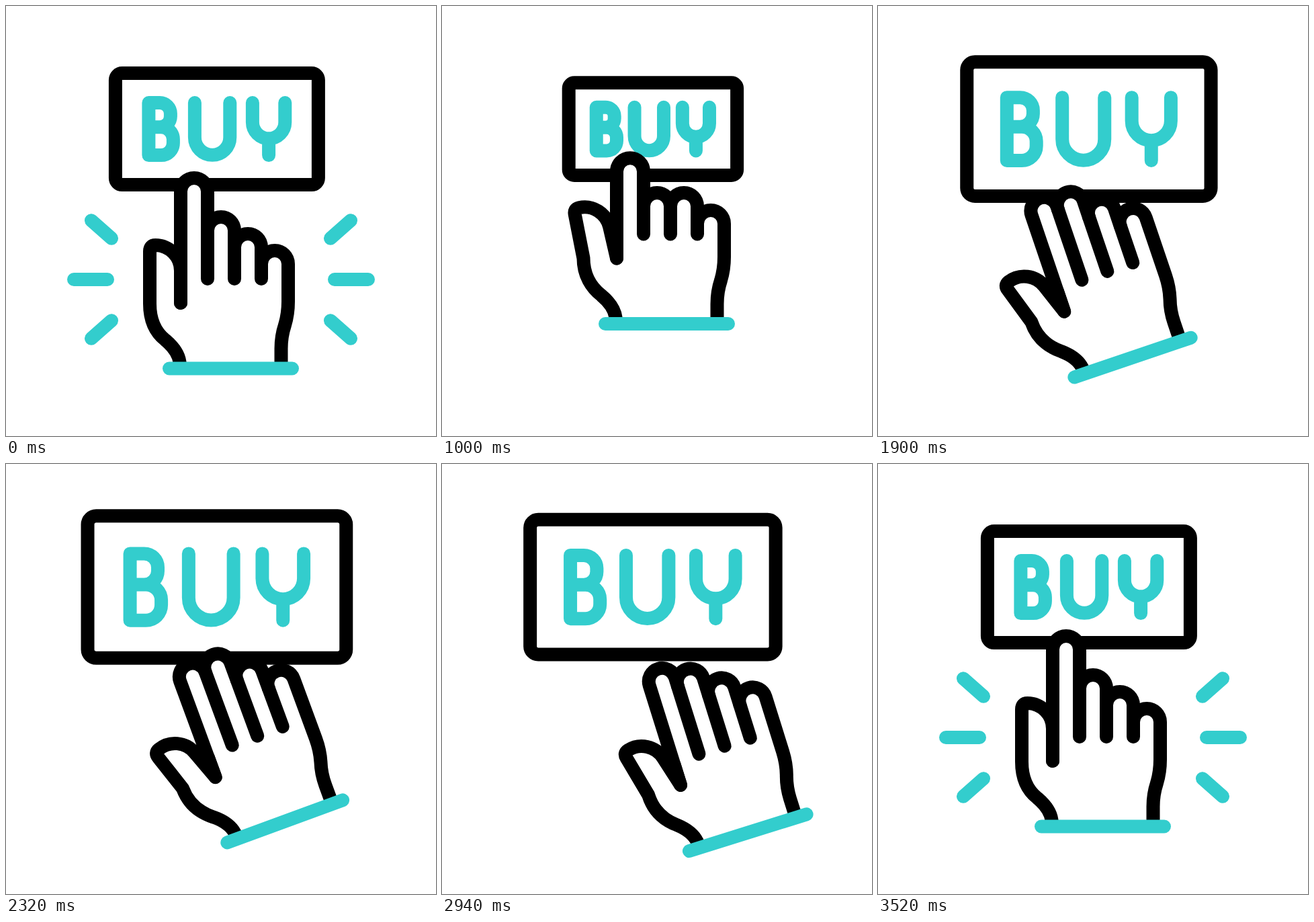
Write an HTML page that moves like this. It is 640 px wide and 640 px high and loops after 3600 ms.

```html
<!DOCTYPE html>
<html lang="en">
<head>
<meta charset="utf-8">
<title>Buy button</title>
<style>
  html, body { margin: 0; width: 100%; height: 100%; overflow: hidden; background: #fff; }
  svg { display: block; width: 100%; height: 100%; }
  path { fill: none; stroke-width: 20; stroke-linejoin: round; }
  .round { stroke-linecap: round; }
  .ink { stroke: #000; }
  .teal { stroke: #33cdcd; }
  .paper { fill: #fff; }
</style>
</head>
<body>
<svg viewBox="0 0 640 640">
  <path id="rays" class="teal round"/>
  <g id="button">
    <path class="ink paper" d="M-141 -83H141a10 10 0 0 1 10 10V73a10 10 0 0 1 -10 10H-141a10 10 0 0 1 -10 -10V-73a10 10 0 0 1 10 -10z"/>
    <path class="teal round" d="M-101.500 -39H-85a16 16 0 0 1 16 16V-18.800a16 16 0 0 1 -16 16H-101.500
      H-83a18 18 0 0 1 18 18V21a18 18 0 0 1 -18 18H-101.500z
      M-33 -39V12.500a26.200 26.200 0 0 0 52.400 0V-39
      M53 -39V-10a24.200 24.200 0 0 0 48.400 0V-39M77.200 14.500V39"/>
  </g>
  <g id="hand">
    <path id="outline" class="ink paper"/>
    <path id="gaps" class="ink round"/>
    <path class="teal round" d="M243 539.500H426"/>
  </g>
</svg>
<script>
const LOOP = 3600;
const el = id => document.getElementById(id);
const [rays, button, hand, outline, gaps] =
  ['rays', 'button', 'hand', 'outline', 'gaps'].map(el);

const mix = (a, b, p) => a + (b - a) * p;
// Eased progress from time a to time b.
function part(t, a, b) {
  const p = Math.min(1, Math.max(0, (t - a) / (b - a)));
  return p * p * (3 - 2 * p);
}

// Progress of every phase of the loop.
const phases = t => ({
  press: part(t, 200, 500),
  lift: part(t, 200, 800),
  bend: part(t, 500, 800),
  tap: t > 500 && t < 1100 ? Math.sin(Math.PI * (t - 500) / 600) ** 2 : 0,
  swing: part(t, 1400, 2000),
  grow: part(t, 1510, 2030),
  drift: part(t, 2000, 2800),
  close: part(t, 2800, 3250),
  home: part(t, 2800, 3400)
});

function drawButton(f) {
  const pressed = mix(1, .813, f.press) + .066 * f.tap;
  const s = mix(mix(pressed, 1.274, f.grow), 1, f.close);
  button.setAttribute('transform', `translate(313.900 183.100) scale(${s})`);
  for (const p of button.children) p.style.strokeWidth = 20 / s;
}

// Height of a fingertip, index finger first.
function fingertip(i, f) {
  const rest = i ? 289 + 25 * i : 256;
  const folded = i ? (i < 3 ? 344.5 : 370.5) : 278;
  const open = i ? 242 + 27.7 * i : 270;
  const lifted = mix(rest, folded, i ? f.lift : f.bend) + (i ? 0 : 60 * f.tap);
  return mix(mix(lifted, open, f.swing), rest, f.close);
}

function drawHand(f) {
  const spread = (13 * f.lift + 7 * f.swing) * (1 - f.close);
  const r = spread * Math.PI / 180, c = Math.cos(r), s = Math.sin(r);
  // Turns a thumb point about the base of the index finger.
  const turn = (x, y) => {
    const dx = x - 260, dy = y - 442;
    return `${260 + dx * c + dy * s} ${442 - dx * s + dy * c}`;
  };
  const bx = 214 - .27 * spread, by = 443 - .1 * spread;
  const tops = [0, 1, 2, 3].map(i => fingertip(i, f));
  const arches = tops.map((y, i) => `V${y + 20}a20 20 0 0 1 40 0`).join('');

  outline.setAttribute('d',
    `M259 536L258.500 530C257 519 249 507 237 497C223 486 ${bx} 468 ${bx} ${by}` +
    `L${turn(214, 365)}Q${turn(214, 356)} ${turn(222.5, 356)}` +
    `A38 38 0 0 1 ${turn(260, 394)}L260 442${arches}` +
    'V440C420 455 418 465 415 475C412 484 409.500 496 409.500 510V536');
  gaps.setAttribute('d', 'M260 410V442' +
    tops.slice(1).map((y, i) => `M${300 + 40 * i} ${y + 20}V406`).join(''));

  const away = 1 - f.home;
  const x = (48 * f.swing + 92.4 * f.drift) * away - 9.6 * f.lift * (1 - f.lift);
  const y = (-66.5 * f.lift + 54 * f.swing + 23.2 * f.drift ** 1.5) * away;
  hand.setAttribute('transform',
    `translate(${x} ${y}) rotate(${-20.2 * f.swing * away} 334.5 539.5)`);
}

function drawRays(t) {
  // Portions measured from the inner end outwards.
  const from = t < 600 ? part(t, 200, 600) : 0;
  const to = t < 600 ? 1 : part(t, 3200, 3520);
  let d = '';
  if (to > from) {
    for (const side of [-1, 1]) {
      for (const row of [-1, 0, 1]) {
        const at = k => {
          const x = row ? 163 + 30 * k : 169 + 50 * k;
          return `${320 + side * x} ${407 + row * (61.2 + 26.6 * k)}`;
        };
        d += `M${at(from)}L${at(to)}`;
      }
    }
  }
  rays.setAttribute('d', d);
}

function draw(t) {
  const f = phases(t);
  drawButton(f);
  drawHand(f);
  drawRays(t);
}

const start = performance.now();
function tick(now) {
  draw(Math.max(0, now - start) % LOOP);
  requestAnimationFrame(tick);
}
draw(0);
requestAnimationFrame(tick);
</script>
</body>
</html>
```
